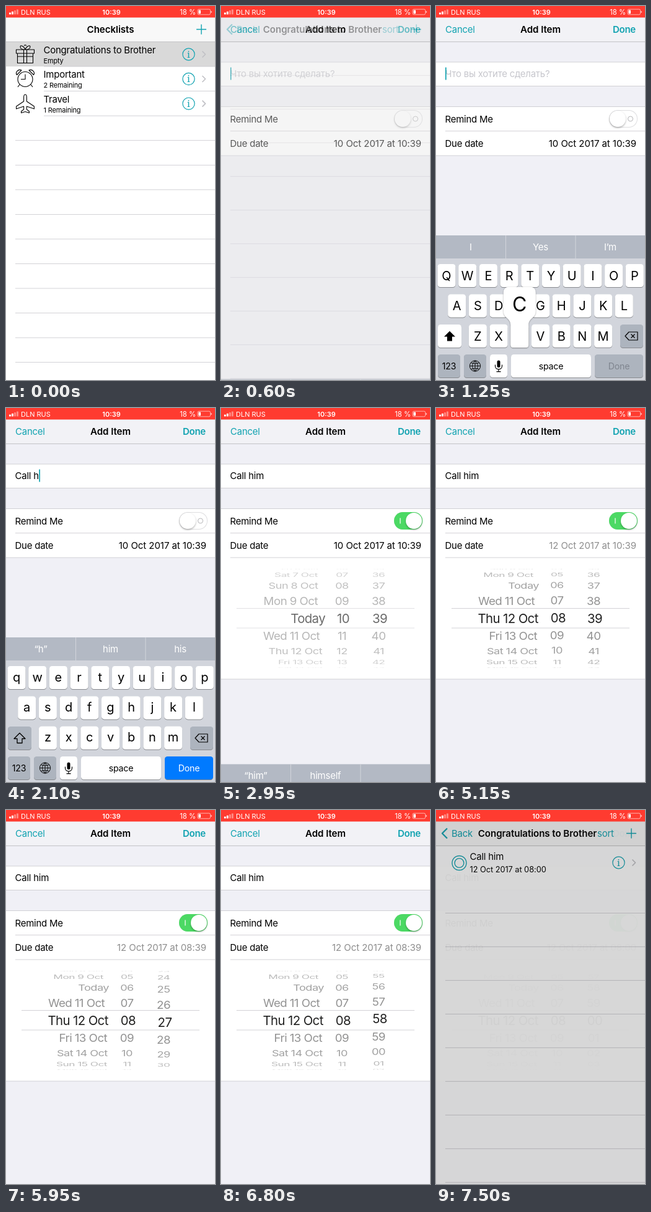
An HTML page with a canvas for the animation above (7.55 s loop, 337 px wide and 600 px high).

```html
<!DOCTYPE html>
<html lang="en">
<head>
<meta charset="utf-8">
<title>Checklists</title>
<style>
html, body { margin: 0; width: 100%; height: 100%; overflow: hidden; background: #fff; }
canvas { display: block; width: 337px; height: 600px; }
</style>
</head>
<body>
<canvas id="stage"></canvas>
<script>
const W = 337, H = 600, LOOP = 7550;
const TEAL = '#12a3b1', LINE = '#c8c7cc', KEY_GREY = '#adb4be';
const FAMILY = 'Inter, "Noto Sans", sans-serif';
const LOOSE = -0.004;
const dpr = window.devicePixelRatio || 1;

function setup(canvas) {
  canvas.width = W * dpr;
  canvas.height = H * dpr;
  const ctx = canvas.getContext('2d');
  ctx.scale(dpr, dpr);
  return ctx;
}
const main = setup(document.getElementById('stage'));
const layer = setup(document.createElement('canvas'));
let c = main;

// timing helpers
const clamp = p => Math.max(0, Math.min(1, p));
const ramp = (t, a, b) => clamp((t - a) / (b - a));
const easeOut = p => 1 - (1 - p) ** 3;
const smooth = p => p * p * (3 - 2 * p);
function track(t, points) {
  let [t0, v] = points[0];
  for (const [t1, v1] of points.slice(1)) {
    if (t < t1) return v + (v1 - v) * smooth(ramp(t, t0, t1));
    t0 = t1;
    v = v1;
  }
  return v;
}

// drawing helpers
function text(s, x, y, size = 15, color = '#000', align = 'left', weight = 400, spacing = -0.016, family = FAMILY) {
  c.font = `${weight} ${size}px ${family}`;
  c.letterSpacing = spacing * size + 'px';
  c.textAlign = align;
  c.fillStyle = color;
  c.fillText(s, x, y);
}
function box(x, y, w, h, color) {
  c.fillStyle = color;
  c.fillRect(x, y, w, h);
}
function round(x, y, w, h, r, color) {
  c.beginPath();
  c.roundRect(x, y, w, h, r);
  c.fillStyle = color;
  c.fill();
}
function stroke(d, color = '#000', width = 1.1) {
  c.strokeStyle = color;
  c.lineWidth = width;
  c.lineJoin = 'round';
  c.stroke(new Path2D(d));
}
function fill(d, color) {
  c.fillStyle = color;
  c.fill(new Path2D(d));
}
function ring(x, y, r, color, width) {
  c.beginPath();
  c.arc(x, y, r, 0, 7);
  c.strokeStyle = color;
  c.lineWidth = width;
  c.stroke();
}
const hline = (x, y, x2 = W, color = LINE) => box(x, y - 0.4, x2 - x, 0.8, color);
function scoped(draw) {
  c.save();
  draw();
  c.restore();
}
function clipped(x, y, w, h, draw) {
  scoped(() => {
    c.beginPath();
    c.rect(x, y, w, h);
    c.clip();
    draw();
  });
}
function shifted(dx, dy, alpha, draw) {
  scoped(() => {
    c.translate(dx, dy);
    c.globalAlpha *= alpha;
    draw();
  });
}
// draws a whole screen as one translucent group
function faded(alpha, draw) {
  if (alpha >= 1) return draw();
  c = layer;
  c.clearRect(0, 0, W, H);
  draw();
  c = main;
  c.globalAlpha = alpha;
  c.drawImage(layer.canvas, 0, 0, W, H);
  c.globalAlpha = 1;
}

function statusBar() {
  box(0, 0, W, 18.5, '#ff3b30');
  for (let i = 0; i < 4; i++) {
    const h = 3 + i * 1.7;
    round(5 + i * 4, 13.5 - h, 3, h, 0.6, i < 2 ? '#fff' : 'rgba(255,255,255,.4)');
  }
  text('DLN RUS', 24, 13.5, 11, '#fff', 'left', 400, 0);
  text('10:39', 170, 13.5, 11, '#fff', 'center', 600, 0);
  text('18 %', 306, 13.5, 11.3, '#fff', 'right', 400, 0);
  c.beginPath();
  c.roundRect(309, 5.2, 20.5, 8.6, 2);
  c.strokeStyle = 'rgba(255,255,255,.75)';
  c.lineWidth = 0.8;
  c.stroke();
  round(310.4, 6.6, 3.6, 5.8, 0.8, '#fff');
  round(330.4, 8, 1.3, 3, 0.6, 'rgba(255,255,255,.75)');
}
function navBar(color) {
  box(0, 18, W, 39.5, color);
  hline(0, 57.3, W, '#b5b5b8');
}
const title = (s, x = 168.5) => text(s, x, 43, 15.1, '#000', 'center', 600, LOOSE);
const plus = () => stroke('M307 37.5h16M315 29.5v16', TEAL, 1.4);

function accessory(y) {
  ring(294.5, y, 9.6, TEAL, 1.2);
  text('i', 294.5, y + 5.3, 15, TEAL, 'center', 500, 0, '"Noto Serif", serif');
  stroke(`M316.5 ${y - 5}l5 5l-5 5`, '#c0c0c5', 1.6);
}

function checklists() {
  box(0, 57, W, H, '#fff');
  box(0, 57.5, W, 39.5, '#d9d9d9');
  const step = 39.55;
  const rows = [['Congratulations to Brother', 'Empty'], ['Important', '2 Remaining'], ['Travel', '1 Remaining']];
  rows.forEach(([name, note], i) => {
    const y = 57.5 + i * step;
    text(name, 60.5, y + 18);
    text(note, 60.5, y + 34, 11);
    accessory(y + 20);
  });
  for (let i = 1; i < 14; i++) hline(i < 4 ? 61 : 15, 57.5 + i * step);
  stroke('M16.5 70h29v6h-29zM18.5 76v15.5h25V76M28.5 70v21.5M33.5 70v21.5M18.5 81h25M31 70c-2-6-8-8-8-4.5 0 3 4 4.5 8 4.5c2-6 8-8 8-4.5 0 3-4 4.5-8 4.5M29.5 64c0-2 3-2 3 0');
  ring(31, 117.5, 12, '#000', 1.1);
  stroke('M31 109.5v8h-7M22 126l-3 4M40 126l3 4M17.5 110.5c-3-4 2-10 7.5-7.5zM44.5 110.5c3-4-2-10-7.5-7.5z');
  stroke('M31 142c2 0 2.4 3 2.4 5v6l12 8v4l-12-4v5l4 3v2.5l-6.4-2-6.4 2v-2.5l4-3v-5l-12 4v-4l12-8v-6c0-2 .4-5 2.4-5z');
}

function listBody(filled) {
  box(0, 57, W, H, '#fff');
  for (let i = filled ? 2 : 1; i < 11; i++) hline(15, 57.3 + i * 54);
  if (!filled) return;
  ring(37.5, 85, 11.5, TEAL, 1.4);
  ring(37.5, 85, 7.4, TEAL, 1.4);
  text('Call him', 54.5, 80);
  text('12 Oct 2017 at 08:00', 54.5, 100, 12.8, '#000', 'left', 400, LOOSE);
  accessory(84.5);
}
function listNav() {
  stroke('M18 29.5l-8 8l8 8', TEAL, 2.3);
  text('Back', 25, 43, 15, TEAL);
  title('Congratulations to Brother', 163.5);
  text('sort', 260, 43, 15, TEAL);
}

// date picker
const WEEK = ['Sun', 'Mon', 'Tue', 'Wed', 'Thu', 'Fri', 'Sat'];
const pad = n => String(n).padStart(2, '0');
const wrap = (n, m) => (n % m + m) % m;
function dayLabel(i, color) {
  const put = (s, x, align) => text(s, x, 7.3, 20.4, color, align, 400, -0.03);
  if (i === 10) return put('Today', 0, 'right');
  put(WEEK[wrap(i - 1, 7)], -65, 'right');
  put(i + ' Oct', -60, 'left');
}
const numberLabel = mod => (i, color) =>
  text(pad(wrap(i, mod)), 0, 7.3, 20.4, color, 'center', 400, -0.03);

function wheel(x, value, label, centre) {
  const mid = Math.round(value);
  for (let i = mid - 5; i <= mid + 5; i++) {
    const a = (i - value) * 0.356, cos = Math.cos(a);
    if (Math.abs(a) > 1.5) continue;
    const s = centre ? 1 : 0.93 - 0.16 * (1 - cos);
    scoped(() => {
      c.translate(x - (centre ? 0 : 2), 338 + 80.3 * Math.sin(a));
      c.scale(s, s * cos);
      label(i, centre ? '#222' : `rgba(0,0,0,${0.45 * cos ** 0.7})`);
    });
  }
}
function picker(t) {
  const day = track(t, [[4000, 10], [4200, 12.5], [4350, 12]]);
  const hour = track(t, [[4700, 10], [5200, 8]]);
  const minute = track(t, [[5450, 39], [5950, 26.9], [6700, -2.1], [6800, -1.9], [7150, 0]]);
  const wheels = centre => {
    wheel(168, day, dayLabel, centre);
    wheel(197, hour, numberLabel(24), centre);
    wheel(256, minute, numberLabel(60), centre);
  };
  clipped(0, 258, W, 63.5, () => wheels(false));
  clipped(0, 353, W, 64, () => wheels(false));
  clipped(0, 321.5, W, 31.5, () => wheels(true));
  hline(25, 321.5, 312);
  hline(25, 353, 312);
}

// typing
const PHRASE = 'Call him';
const pressAt = i => 1150 + i * 160;
const typedCount = t => [...PHRASE].filter((_, i) => t >= pressAt(i) + 130).length;
const pressedKey = t => [...PHRASE].find((_, i) => t >= pressAt(i) && t < pressAt(i) + 130);

function suggestions(n) {
  if (n === 0) return ['I', 'Yes', 'I’m'];
  if (n < 4) return [`“${PHRASE.slice(0, n)}”`, 'Call', 'Can'];
  if (n === 4) return ['“Call”', 'Called', 'Calling'];
  if (n === 5) return ['me', 'you', 'him'];
  if (n < 8) return [`“${PHRASE.slice(5, n)}”`, 'him', 'his'];
  return ['“him”', 'himself', ''];
}
function key(x, y, w, color = '#fff') {
  round(x, y + 1, w, 37, 4.5, '#898b90');
  round(x, y, w, 37, 4.5, color);
}
function keyboard(t) {
  const n = typedCount(t), down = pressedKey(t), upper = n === 0;
  box(0, 368, W, 37.5, '#b3b9c4');
  box(0, 405, W, 195, '#d2d5dc');
  suggestions(n).forEach((s, i) => text(s, 56 + i * 112.5, 391.5, 15, '#fff', 'center'));
  for (const x of [112, 224.5]) box(x, 368, 1, 37, '#d2d5dc');

  let popup;
  [['QWERTYUIOP', 17], ['ASDFGHJKL', 33.7], ['ZXCVBNM', 67.4]].forEach(([letters, x0], row) => {
    [...letters].forEach((ch, i) => {
      const x = x0 + i * 33.7, y = 414 + row * 48.4;
      const s = upper ? ch : ch.toLowerCase();
      key(x - 14.5, y, 29);
      if (s === down) popup = [s, x, y];
      else text(s, x, y + (upper ? 26 : 24.5), 20, '#000', 'center', 400, 0);
    });
  });

  key(3, 511, 38, upper ? '#fff' : KEY_GREY);
  const arrow = 'M22 521.5l9 9h-5v7h-8v-7h-5z';
  if (upper) fill(arrow, '#000');
  else stroke(arrow, '#000', 1.3);
  key(297, 511, 37, KEY_GREY);
  stroke('M311 523h14v13h-14l-6-6.5zM314.5 526.5l6 6M320.5 526.5l-6 6', '#000', 1.2);

  key(3, 559, 36, KEY_GREY);
  text('123', 21, 583, 14.2, '#000', 'center');
  key(45, 559, 36, KEY_GREY);
  ring(63, 577.5, 8.6, '#000', 1);
  stroke('M54.5 577.5h17M63 569v17M56 572.5q7 3 14 0M56 582.5q7-3 14 0M63 569c-6 5-6 12 0 17c6-5 6-12 0-17', '#000', 0.9);
  key(87, 559, 28);
  round(98.5, 568.5, 5, 11.5, 2.5, '#000');
  stroke('M95.5 575.5v2c0 7 11 7 11 0v-2M101 582.5v4M97.5 586.7h7', '#000', 1.2);
  key(121, 559, 129, down === ' ' ? KEY_GREY : '#fff');
  text('space', 185.5, 582.5, 14.2, '#000', 'center');
  key(256, 559, 78, n ? '#007aff' : KEY_GREY);
  text('Done', 295, 582.5, 14.2, n ? '#fff' : '#7f858f', 'center');

  if (popup) {
    const [s, x, y] = popup;
    scoped(() => {
      c.translate(x, y);
      c.shadowColor = 'rgba(0,0,0,.4)';
      c.shadowBlur = 2 * dpr;
      c.shadowOffsetY = dpr * 0.5;
      fill('M-17-60h34q9 0 9 9v30c0 11-11.5 11-11.5 22v32q0 4.5-4.5 4.5h-20q-4.5 0-4.5-4.5v-32c0-11-11.5-11-11.5-22v-30q0-9 9-9z', '#fff');
    });
    text(s, x, y - 21, 32, '#000', 'center', 400, 0);
  }
}

function toggle(p) {
  round(279, 167, 46, 28, 14, '#dedee0');
  round(280, 168, 44, 26, 13, '#fff');
  ring(313.5, 181, 4, '#b5b5b8', 1);
  shifted(0, 0, p, () => {
    round(279, 167, 46, 28, 14, '#4cd964');
    box(288.4, 176.5, 1.2, 9, '#fff');
  });
  scoped(() => {
    c.shadowColor = 'rgba(0,0,0,.3)';
    c.shadowBlur = 3 * dpr;
    c.shadowOffsetY = 1.5 * dpr;
    round(280 + 18 * p, 168, 26, 26, 13, '#fff');
  });
}
function dueDate(t) {
  const day = t < 4350 ? 10 : 12;
  const time = t < 5300 ? '10:39' : t < 7150 ? '08:39' : '08:00';
  return `${day} Oct 2017 at ${time}`;
}
function addItem(t) {
  box(0, 57, W, H, '#f0f0f6');
  navBar('#f2f2f6');
  text('Cancel', 15, 43, 15, TEAL);
  title('Add Item');
  text('Done', 322, 43, 15, TEAL, 'right', 600);

  box(0, 90, W, 38.5, '#fff');
  hline(0, 90);
  hline(0, 128.5);
  const typed = PHRASE.slice(0, typedCount(t));
  if (typed) text(typed, 14.5, 113.7);
  else text('Что вы хотите сделать?', 15, 113.7, 15, '#c7c7cd');
  if (t < 2750) box(15 + (typed ? c.measureText(typed).width : 0), 98.5, 1.7, 20, TEAL);

  const open = easeOut(ramp(t, 2750, 2960));
  const bottom = 240 + 195 * open;
  box(0, 161.5, W, bottom - 161.5, '#fff');
  hline(0, 161.5);
  hline(15, 200.7);
  if (open) hline(15, 240);
  hline(0, bottom);
  text('Remind Me', 14.5, 186.7);
  toggle(smooth(ramp(t, 2450, 2700)));
  text('Due date', 14.5, 226.3);
  const shade = Math.round(142 * ramp(t, 3000, 3250));
  text(dueDate(t), 323, 226.3, 15, `rgb(${shade},${shade},${shade})`, 'right', 400, LOOSE);
  if (open) clipped(0, 240, W, bottom - 240, () => shifted(0, 0, ramp(t, 2750, 3050), () => picker(t)));

  const hidden = t < 2000 ? 1 - easeOut(ramp(t, 600, 1000)) : easeOut(ramp(t, 2750, 3150));
  if (hidden < 1) shifted(0, 232 * hidden, 1, () => keyboard(t));
}

function draw(t) {
  const push = easeOut(ramp(t, 0, 320)) * (t >= 50);
  const appear = t < 7350 ? ramp(t, 450, 700) : 1 - ramp(t, 7350, 7505);
  if (appear < 1) {
    if (push < 1) shifted(-100 * push, 0, 1, checklists);
    if (push) shifted(W * (1 - push), 0, 1, () => listBody(t > 7000));
    navBar('#f8f8f8');
    if (push < 1) shifted(-110 * push, 0, 1 - push, () => title('Checklists'));
    if (push) shifted(120 * (1 - push), 0, push, listNav);
    plus();
    const dim = t < 7350 ? appear : 1;
    box(0, 18, W, H, `rgba(0,0,0,${0.16 * dim})`);
  }
  if (appear) faded(appear, () => addItem(t));
  statusBar();
}

const start = performance.now();
function tick() {
  draw((performance.now() - start) % LOOP);
  requestAnimationFrame(tick);
}
tick();
</script>
</body>
</html>
```
